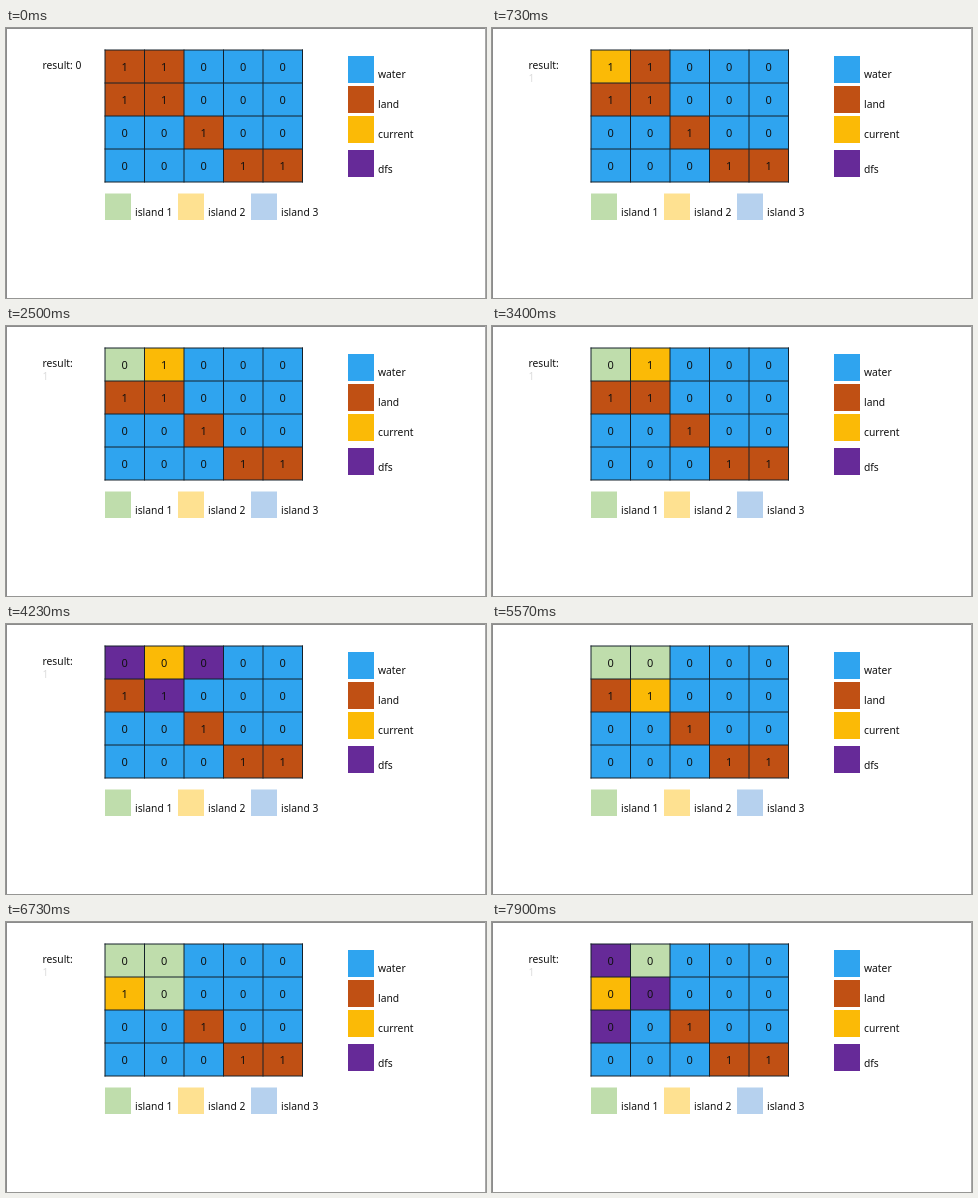
Animation of 480x270 px, one loop 8 s. Source, as an HTML page:

```html
<!DOCTYPE html>
<html lang="en">
<head>
<meta charset="utf-8">
<title>Counting islands</title>
<style>
  html, body { margin: 0; width: 100%; height: 100%; overflow: hidden; background: #fff; }
  svg { display: block; width: 100vw; height: 100vh; }
  text { font: 10.3px "Noto Sans", "Open Sans", sans-serif; fill: #111; }
  .digit { font-size: 11px; text-anchor: middle; }
</style>
</head>
<body>
<svg id="stage" viewBox="0 0 480 270"></svg>
<script>
const stage = document.getElementById('stage');
const LOOP = 8000, START = 310, STEP = 1065;
const ROWS = 4, COLS = 5, LEFT = 99, TOP = 22, CELL_W = 39.5, CELL_H = 33;
const COLOR = {
  water: '#2fa4ef', land: '#c05014', current: '#fbba06', dfs: '#662a98',
  island1: '#bfddac', island2: '#fee191', island3: '#b6d1ee'
};
const MAP = ['11000', '11000', '00100', '00011'];
const VISITS = [[0, 0], [0, 1], [1, 1], [1, 0]];

function add(tag, attrs, content = '') {
  const node = document.createElementNS('http://www.w3.org/2000/svg', tag);
  for (const key in attrs) node.setAttribute(key, attrs[key]);
  node.textContent = content;
  return stage.appendChild(node);
}
const box = (x, y, width, height, fill) => add('rect', { x, y, width, height, fill });
const label = (x, y, content) => add('text', { x, y }, content);

// Page edges
box(0, 0, 480, 270, '#fff');
box(0, 0, 480, 1, '#8c8c8c');
box(0, 0, 1, 270, '#8c8c8c');
box(479, 0, 1, 270, '#a8a8a8');

// Grid
const cells = [];
for (let r = 0; r < ROWS; r++) {
  for (let c = 0; c < COLS; c++) {
    const x = LEFT + c * CELL_W, y = TOP + r * CELL_H;
    const rect = box(x, y, CELL_W, CELL_H);
    const digit = add('text', { x: x + CELL_W / 2, y: y + 21, class: 'digit' });
    cells.push({ r, c, rect, digit });
  }
}
let lines = '';
for (let c = 0; c <= COLS; c++) lines += `M${LEFT + c * CELL_W} ${TOP}v${ROWS * CELL_H}`;
for (let r = 0; r <= ROWS; r++) lines += `M${LEFT} ${TOP + r * CELL_H}h${COLS * CELL_W}`;
add('path', { d: lines, stroke: '#14202a', 'stroke-width': 1, 'stroke-linecap': 'square' });

// Legends
[['water', 28, 50], ['land', 58, 80], ['current', 88, 110], ['dfs', 122, 145]]
  .forEach(([name, y, base]) => {
    box(342, y, 26, 27, COLOR[name]);
    label(372, base, name);
  });
for (let i = 0; i < 3; i++) {
  box(99 + 73 * i, 165.5, 26, 26.5, COLOR['island' + (i + 1)]);
  label(129 + 73 * i, 188, 'island ' + (i + 1));
}

const result = label(36.5, 41, '');
const count = label(36.5, 54, '1');
count.style.fill = '#dcdcdc';

// Each visited cell takes two steps: mark as current, then search its neighbours.
function draw(time) {
  const step = Math.floor((time - START) / STEP);
  const visit = Math.floor(step / 2);
  const searching = step >= 0 && step % 2 === 1;
  const here = VISITS[visit];

  for (const { r, c, rect, digit } of cells) {
    const order = VISITS.findIndex(([vr, vc]) => vr === r && vc === c);
    const done = order >= 0 && order < visit;
    const distance = here ? Math.abs(here[0] - r) + Math.abs(here[1] - c) : Infinity;
    const cleared = done || (searching && distance === 0);

    let kind = MAP[r][c] === '1' ? 'land' : 'water';
    if (done) kind = 'island1';
    if (distance === 0) kind = 'current';
    if (searching && distance === 1) kind = 'dfs';

    rect.setAttribute('fill', COLOR[kind]);
    digit.textContent = cleared ? '0' : MAP[r][c];
  }

  const started = step >= 0, hidden = step === 4;
  result.textContent = hidden ? '' : started ? 'result:' : 'result: 0';
  count.style.display = started && !hidden ? '' : 'none';
}

const begin = performance.now();
function tick() {
  draw((performance.now() - begin) % LOOP);
  requestAnimationFrame(tick);
}
draw(0);
requestAnimationFrame(tick);
</script>
</body>
</html>
```
